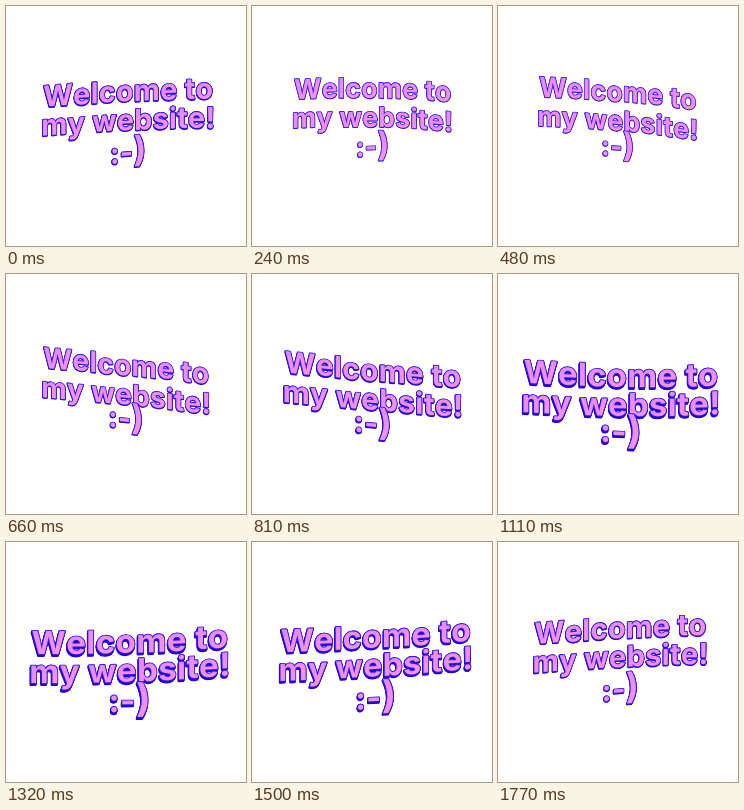
Write an HTML page with a canvas that moves like this. It is 240x240 px and loops after 1800 ms.

```html
<!DOCTYPE html>
<html lang="en">
<head>
<meta charset="utf-8">
<title>Welcome</title>
<style>
  html, body { margin: 0; width: 100%; height: 100%; overflow: hidden; background: #fff; }
  canvas { display: block; width: 240px; height: 240px; }
</style>
</head>
<body>
<canvas id="stage" width="240" height="240" role="img" aria-label="Welcome to my website! :-)"></canvas>
<script>
const LOOP = 1800, STEP = 30;
const EDGE = '#2e18f2', SIDE = '#2408cc';
const LINES = ['Welcome to', 'my website!', ':-)'];
const SIZE = 29.6, SPACING = 0.4, LEADING = 29, BASE = 101.5;
const LAG = 8 * Math.PI / 180;   // phase shift from one letter to the next
const WAVE = 10.5;

const ctx = document.getElementById('stage').getContext('2d');
const setFont = size => ctx.font = `700 ${size}px Inter, "Open Sans", sans-serif`;
const sizeOf = char => char === ')' ? SIZE * 1.2 : SIZE;
const swing = (t, peak) => Math.cos(2 * Math.PI * (t - peak) / LOOP);

function layout() {
  return LINES.flatMap((line, row) => {
    let x = 0;
    const glyphs = [...line].map((char, i) => {
      setFont(sizeOf(char));
      const w = ctx.measureText(char).width;
      const glyph = { char, i, row, x: x + w / 2 };
      x += w + SPACING;
      return glyph;
    });
    for (const g of glyphs) g.x -= (x - SPACING) / 2;
    return glyphs.filter(g => g.char !== ' ');
  });
}

function drawGlyph(g, t, near) {
  const phase = 2 * Math.PI * (t - 1300) / LOOP + g.i * LAG;
  const zoom = 1 + 0.118 * near;
  const y = BASE + g.row * LEADING + WAVE * Math.cos(phase) + 0.2 * g.i;
  const slope = (0.2 - WAVE * LAG * Math.sin(phase)) / (17 * zoom);
  const depth = 1.1 + 0.9 * near;

  ctx.save();
  ctx.translate(121.8 + 2 * swing(t, 1400) + g.x * zoom, y);
  ctx.transform(zoom, slope, 0, 1 + 0.08 * near, 0, 0);
  setFont(sizeOf(g.char));
  ctx.lineWidth = 1.6;
  ctx.strokeStyle = SIDE;
  for (let d = depth; d > 0; d -= 0.4) ctx.strokeText(g.char, -d * 0.3, d);
  ctx.strokeStyle = EDGE;
  ctx.strokeText(g.char, 0, 0);
  ctx.fillStyle = face;
  ctx.fillText(g.char, 0, 0);
  ctx.restore();
}

ctx.textAlign = 'center';
ctx.lineJoin = 'round';
const face = ctx.createLinearGradient(-10, -20, 10, 2);
face.addColorStop(0, '#e48af2');
face.addColorStop(1, '#fc92de');
const glyphs = layout();
const start = performance.now();

function draw(now) {
  const elapsed = Math.max(0, now - start) % LOOP;
  const t = Math.floor(elapsed / STEP) * STEP;
  ctx.fillStyle = '#fff';
  ctx.fillRect(0, 0, 240, 240);
  const near = swing(t, 1260);
  for (const g of glyphs) drawGlyph(g, t, near);
  requestAnimationFrame(draw);
}
draw(start);
</script>
</body>
</html>
```
